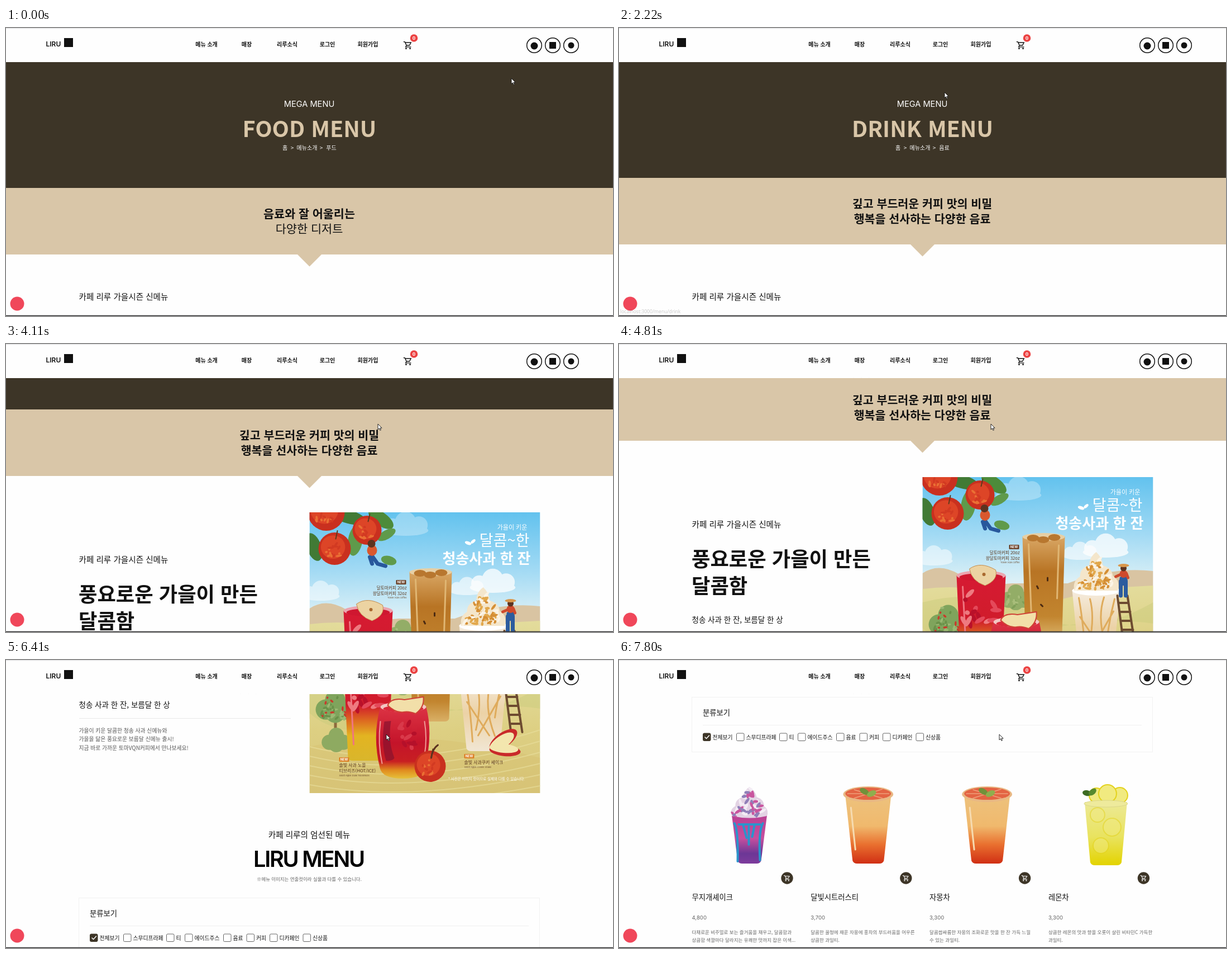
These frames come from a looping animation (1087x515 px, 8 s). An HTML page:

```html
<!DOCTYPE html>
<html lang="ko">
<head>
<meta charset="utf-8">
<title>Cafe menu</title>
<style>
  html, body { margin: 0; width: 100%; height: 100%; overflow: hidden; background: #fefefe; }
  svg { display: block; }
  text { font-family: "Noto Sans CJK KR", "Noto Sans CJK", "Noto Sans CJK JP", sans-serif; }
  .latin { font-family: Inter, "Noto Sans CJK KR", sans-serif; }
  .status { font-family: "Open Sans", sans-serif; }
</style>
</head>
<body>
<script>
const LOOP = 8000, NOTCH = 71.7, DROP = 93;
const BROWN = '#3d3527', TAN = '#d9c6a8', INK = '#111';

// ---------- drawing helpers ----------
const text = (x, middle, size, str, { w = 400, a = 'start', c = INK, ls = 0, cls = '' } = {}) =>
  `<text x="${x}" y="${middle + size * 0.37}" font-size="${size}" font-weight="${w}" text-anchor="${a}" fill="${c}" letter-spacing="${ls}" class="${cls}">${str}</text>`;
const mid = (x, y, size, str, o = {}) => text(x, y, size, str, { a: 'middle', ...o });
const rect = (x, y, w, h, fill, extra = '') => `<rect x="${x}" y="${y}" width="${w}" height="${h}" fill="${fill}" ${extra}/>`;
const oval = (x, y, rx, ry, fill, extra = '') => `<ellipse cx="${x}" cy="${y}" rx="${rx}" ry="${ry}" fill="${fill}" ${extra}/>`;
const dot = (x, y, r, fill, extra) => oval(x, y, r, r, fill, extra);
const path = (d, fill, extra = '') => `<path d="${d}" fill="${fill}" ${extra}/>`;
const line = (d, color, width = 1) => path(d, 'none', `stroke="${color}" stroke-width="${width}" stroke-linecap="round"`);
const group = (id, body, extra = '') => `<g id="${id}" ${extra}>${body}</g>`;
const at = (x, y, body, extra = '') => `<g transform="translate(${x} ${y}) ${extra}">${body}</g>`;
const leaf = (x, y, rx, ry, angle, fill) => oval(x, y, rx, ry, fill, `transform="rotate(${angle} ${x} ${y})"`);
const grad = (id, ...stops) => `<linearGradient id="${id}" x2="0" y2="1">${stops.map(([o, c]) =>
  `<stop offset="${o}" stop-color="${c}"/>`).join('')}</linearGradient>`;
const cup = (x, top, wTop, bottom, wBottom, fill) =>
  path(`M${x - wTop / 2} ${top}L${x - wBottom / 2} ${bottom - 5}q2 5 8 5h${wBottom - 16}q6 0 8-5L${x + wTop / 2} ${top}z`, fill);
const cart = (x, y, scale, color) => at(x, y,
  line('M1 3h2.7l4.3 9h7.5l3.8-7H5M8 12l-2 4h13', color, 2) + dot(7, 20, 2, color) + dot(17, 20, 2, color), `scale(${scale})`);

let seed = 7;
const random = () => (seed = seed * 16807 % 2147483647) / 2147483647;
// Flecks scattered over a trapezoid: half width grows from r0 at y0 to r1 at y1.
const flecks = (n, x, y0, y1, r0, r1, size, ...colors) => Array.from({ length: n }, (_, i) => {
  const p = Math.sqrt(random()), dx = (random() * 2 - 1) * (r0 + (r1 - r0) * p);
  return leaf(x + dx, y0 + (y1 - y0) * p, size * (.5 + random()), size * .5, random() * 180, colors[i % colors.length]);
}).join('');

const defs = `<defs>
  ${grad('sky', [0, '#62c2ee'], [.25, '#a2daf4'], [.45, '#dcf0f6'])}
  ${grad('field', [0, '#e3dc9c'], [.5, '#ddcf82'], [1, '#d8c67c'])}
  ${grad('coffee', [0, '#d9a765'], [.35, '#b87424'], [.8, '#c2852f'], [1, '#d9b066'])}
  ${grad('sunset', [0, '#d61a33'], [.45, '#d01c2b'], [.6, '#dd6a20'], [.75, '#e3b421'], [1, '#d9b62c'])}
  ${grad('tea', [0, '#dc3344'], [.5, '#c4142a'], [.76, '#c81f22'], [.88, '#e08a1e'], [1, '#e6c13a'])}
  ${grad('frappe', [0, '#f5ecdf'], [.5, '#ecd2a6'], [1, '#f1e6d3'])}
  ${grad('galaxy', [0, '#b93f92'], [.5, '#c64f9e'], [.8, '#6c3796'], [1, '#7d3b9c'])}
  ${grad('ruby', [0, '#edc27d'], [.45, '#f0b96d'], [.72, '#e9702f'], [1, '#d02f14'])}
  ${grad('lemon', [0, '#ece996'], [.55, '#e9e35f'], [1, '#e3d300'])}
  <clipPath id="frame"><rect width="413" height="413"/></clipPath>
  <clipPath id="navClip"><rect id="navShape" width="1087" height="61"/></clipPath>
</defs>`;

// ---------- poster ----------
const apple = (x, y, r) => dot(x, y, r, '#c9301f') + oval(x - r * .1, y - r * .1, r * .75, r * .72, '#dd4527') +
  flecks(14, x - r * .1, y - r * .5, y + r * .5, r * .3, r * .5, 4, '#ea7034', '#d23a22') +
  line(`M${x + 2} ${y - r * .6}l3 -${r * .5}`, '#5c3a1c', 2);
const tag = (x, y, fill) => rect(x, y, 18, 8, fill, 'rx="1"') + mid(x + 9, y + 4, 5.6, 'NEW', { w: 700, c: '#fff', cls: 'latin' });
const shrub = (x, y, r, fill) => [[-.6, .2], [.6, .2], [0, -.4], [0, .4]].map(([dx, dy]) => dot(x + dx * r, y + dy * r, r * .65, fill)).join('');
const cloud = (x, y, r, alpha) => `<g opacity="${alpha}">` + dot(x - r, y + r * .3, r * .6, '#fff') + dot(x, y, r * .8, '#fff') +
  dot(x + r, y + r * .2, r * .65, '#fff') + oval(x, y + r * .6, r * 1.7, r * .4, '#fff') + '</g>';

const label = { c: '#5c3a20', w: 500 }, tiny = { c: '#6b4a2c', cls: 'latin' };
const poster = group('poster', `<g clip-path="url(#frame)">` +
  rect(0, 0, 413, 413, 'url(#sky)') +
  cloud(172, 18, 24, .3) + cloud(328, 120, 24, .75) + cloud(282, 130, 18, .6) + cloud(20, 138, 20, .5) +
  path('M0 172Q30 152 66 174T160 190L260 190Q340 160 413 168V280H0z', '#d9c4a2') +
  path('M0 200Q80 190 160 212T300 200L413 194V413H0z', 'url(#field)') +
  path('M0 224Q110 196 200 245T413 224V262Q300 246 180 285T0 270z', '#c8cb7a', 'opacity=".45"') +
  path('M0 330Q180 290 413 350V413H0z', '#d3bd6c', 'opacity=".35"') +
  `<g opacity=".6">` + Array.from({ length: 6 }, (_, i) => line(`M0 ${330 + i * 17}Q180 ${375 + i * 14} 413 ${300 + i * 20}`, '#e9df9f', 2)).join('') + '</g>' +
  leaf(70, 8, 32, 12, 15, '#417a35') + leaf(128, 12, 26, 12, 35, '#4d8b3a') + leaf(82, 50, 28, 13, 100, '#5f9a4b') +
  leaf(8, 62, 26, 13, 70, '#417a35') + leaf(138, 40, 18, 8, -30, '#5f9a4b') + leaf(142, 86, 14, 8, 15, '#5f9a4b') +
  apple(30, 0, 33) + apple(103, 32, 26) + apple(45, 65, 29) +
  line('M112 78l10 14l14 4M108 80l4 12', '#28589c', 7) + oval(112, 68, 9, 10, '#d9582e') + dot(111, 56, 7, '#5d3320') +
  mid(363, 27, 11, '가을이 키운', { c: '#fff' }) +
  mid(349, 50, 27, '달콤~한', { c: '#fff' }) + mid(317, 82, 26, '청송사과 한 잔', { c: '#fff', w: 700 }) +
  leaf(284, 55, 6, 3, 20, '#fff') + leaf(293, 52, 5, 2.5, -40, '#fff') +
  tag(155, 121, '#6b4128') +
  text(174, 135, 7.6, '달토마커피 20oz', { ...label, a: 'end' }) + text(174, 145, 7.6, '왕달토마커피 32oz', { ...label, a: 'end' }) +
  text(174, 152.5, 3.9, 'TOMA VQN Coffee', { ...tiny, a: 'end' }) +
  shrub(167, 215, 22, '#93ad67') + flecks(20, 167, 200, 232, 10, 24, 4, '#7f9f58', '#a8bd7a') +
  rect(44, 270, 5, 52, '#8d6b3d') + shrub(46, 258, 28, '#7fa45c') + shrub(48, 318, 21, '#8eaa61') +
  flecks(30, 46, 232, 280, 14, 28, 4, '#6a9149', '#9bb873') + flecks(10, 46, 232, 276, 12, 26, 3.5, '#c93a2b') +
  // iced coffee
  cup(217, 106, 76, 285, 66, 'url(#coffee)') + oval(217, 107, 38, 7, '#e7cfa4') +
  [[198, 109], [216, 112], [236, 108]].map(([x, y]) => oval(x, y, 11, 6, '#b8772f')).join('') +
  line('M190 120l5 130M244 122l-3 95', '#e0b673', 3) + line('M205 195l2 4M224 180l0 5M212 228l3 3', '#4b2a12', 3) +
  // tall red drink
  cup(105, 176, 88, 355, 72, 'url(#sunset)') + oval(105, 176, 44, 9, '#eba5b0') + oval(105, 179, 39, 7, '#cf1730') +
  path('M84 164Q104 150 131 166Q136 184 112 194Q88 186 84 164z', '#ecd3a2', 'stroke="#c28b4c"') + dot(110, 174, 3, '#a9692f') +
  line('M72 196l7 130', '#ef7680', 3) + flecks(16, 105, 196, 262, 30, 34, 8, '#e4495a', '#b9102a', '#ee7a80') +
  // whipped frappe
  cup(311, 202, 86, 338, 60, 'url(#frappe)') + oval(311, 203, 43, 9, '#fff') +
  path('M311 134Q322 144 323 158Q339 162 341 177Q354 184 350 203H272Q268 186 282 178Q282 162 299 158Q298 144 311 134z', '#f4e6cb') +
  flecks(75, 311, 140, 200, 5, 36, 4.5, '#e2a84c', '#fbf4e6', '#d58f35') +
  line('M280 216q8 45 12 105M300 218q9 34 -2 82M325 215q-14 42 7 96M344 218q-8 30 -12 60M282 250l40 60M342 240l-40 70', '#dfab5c', 3) +
  // ladder and picker
  line('M349 212l12 94M367 212l14 92M352 225h17M354 241h18M356 257h18M359 273h18M361 289h18', '#6d4b30', 4) +
  line('M355 186v26M364 186v26', '#2c5c9e', 7) + rect(353, 178, 14, 16, '#2c5c9e', 'rx="3"') +
  line('M355 174l-9 4M365 172l3 8', '#cf4a2c', 5) + oval(360, 173, 7, 7, '#cf4a2c') + dot(360, 163, 5.5, '#5d3320') + oval(360, 158, 10, 3, '#d9974c') +
  // front glass
  path('M127 259Q112 310 126 368Q130 387 167 387T206 368Q222 310 209 259z', 'url(#tea)') +
  oval(168, 259, 41, 9, '#f3c6c2') + oval(168, 262, 36, 6, '#d9283a') +
  path('M140 256Q146 242 170 246L204 241Q206 260 190 271Q178 266 168 268Q154 270 140 256z', '#f2dfa9', 'stroke="#cf4236" stroke-width="2"') +
  path('M134 285Q128 325 137 355Q150 356 152 350Q140 320 146 284z', '#83122f', 'opacity=".65"') +
  line('M127 285q-5 40 3 75M206 285q5 30 0 60', '#f09a94', 2) + flecks(10, 180, 275, 335, 20, 24, 7, '#d9394a', '#b5102a') +
  apple(216, 365, 28) + line('M218 350Q220 334 230 327', '#5c3320', 3) +
  leaf(347, 318, 29, 13, -35, '#c92a2a') + leaf(344, 322, 26, 11, -35, '#f3e6ae') +
  leaf(350, 337, 28, 10, 5, '#c92a2a') + leaf(348, 333, 26, 8, 5, '#f3e6ae') +
  tag(53, 349, '#dc8127') + text(53, 363, 7.9, '솔빛 사과 노을', label) + text(53, 373, 7.9, '티브리즈(HOT/ICE)', label) +
  text(53, 382, 3.9, 'Solbit Apple Dusk Tea Breeze', tiny) +
  tag(277, 343, '#dc8127') + text(277, 358, 7.9, '솔빛 사과쿠키 셰이크', label) +
  text(277, 366.5, 3.9, 'Solbit Apple Cookie Shake', tiny) +
  mid(317, 388, 6.5, '* 사진은 이미지 컷이므로 실제와 다를 수 있습니다.', { c: '#fff' }) +
  '</g>', 'transform="translate(543.5 470)"');

// ---------- product list ----------
const swirlCup = cup(103, 1278, 64, 1368, 42, 'url(#galaxy)') +
  path('M103 1231Q114 1238 116 1249Q130 1254 129 1265Q139 1272 134 1283Q103 1290 72 1283Q66 1272 78 1265Q77 1254 91 1249Q93 1238 103 1231z', '#e3d3e4') +
  flecks(45, 103, 1234, 1282, 4, 30, 5, '#c9569f', '#f4edf5', '#8f7fb8') +
  line('M76 1296q7 10 6 68M84 1298h38M92 1300l6 22M102 1302v32M112 1300l-4 20M127 1296q-8 14 -5 66', '#2a94cc', 4);
const rubyCup = cup(103, 1246, 82, 1368, 56, 'url(#ruby)') + oval(103, 1244, 45, 14, '#e9b884') +
  oval(103, 1243, 41, 11, '#e36443') + line('M66 1243h74M78 1236l50 15M128 1235l-50 16', '#efa07c', 1.5) +
  leaf(96, 1239, 9, 5, 30, '#71913a') + leaf(109, 1243, 9, 5, -25, '#8fae4d') + line('M72 1268l8 75', '#f6dbb0', 3);
const slice = (x, y, r) => dot(x, y, r, '#f1ea80', 'stroke="#e3d21c" stroke-width="2"');
const lemonCup = cup(103, 1258, 76, 1371, 56, 'url(#lemon)') + slice(86, 1246, 13) + slice(128, 1246, 14) + slice(106, 1243, 16) +
  oval(103, 1261, 39, 6, '#eeea9c', 'stroke="#dbd78a"') +
  `<g opacity=".5">${slice(88, 1281, 13) + slice(114, 1303, 16) + slice(94, 1336, 14)}</g>` +
  leaf(69, 1242, 8, 5, 10, '#3d6b23') + leaf(79, 1240, 8, 5, -40, '#588a2e');

const products = [
  ['무지개셰이크', '4,800', '다채로운 비주얼로 보는 즐거움을 채우고, 달콤함과', '상큼함 색깔마다 달라지는 유쾌한 맛까지 잡은 이색...', swirlCup],
  ['달빛시트러스티', '3,700', '달콤한 꿀청에 재운 자몽에 홍차의 부드러움을 어우른', '상큼한 과일티.', rubyCup],
  ['자몽차', '3,300', '달콤쌉싸름한 자몽의 조화로운 맛을 한 잔 가득 느낄', '수 있는 과일티.', rubyCup],
  ['레몬차', '3,300', '상큼한 레몬의 맛과 향을 오롯이 살린 비타민C 가득한', '과일티.', lemonCup],
].map(([name, price, first, second, art], i) => at(130.5 + 212.8 * i, 0, art +
  dot(170.5, 1394, 10.7, BROWN) + cart(164.5, 1388, .52, '#fff') +
  text(0, 1428.5, 13.3, name) + text(0, 1464.5, 9.6, price, { c: '#666', cls: 'latin' }) +
  text(0, 1490.5, 8.5, first, { c: '#666' }) + text(0, 1504.5, 8.5, second, { c: '#666' }))).join('');

// ---------- page ----------
const crumb = (x, str) => mid(x, 214, 10, str, { w: 500, c: '#fff' });
const hero = rect(0, 61, 1087, 225, BROWN) + mid(543, 136, 14.6, 'MEGA MENU', { c: '#fff', cls: 'latin' }) +
  ['food', 'drink'].map(kind => group(kind, mid(543.5, 180, 39.5, kind.toUpperCase() + ' MENU', { w: 700, c: TAN }) +
    crumb(582.5, kind === 'food' ? '푸드' : '음료'))).join('') +
  crumb(499.5, '홈') + crumb(512.5, '&gt;') + crumb(539, '메뉴소개') + crumb(564.5, '&gt;');
const banner = group('banner', rect(0, 286, 1087, 119, TAN) + path('M522 405h43l-21.5 21.5z', TAN) +
  group('foodSlogan', mid(543, 332, 20.7, '음료와 잘 어울리는', { w: 700 }) + mid(543, 359, 20.8, '다양한 디저트')) +
  group('drinkSlogan', mid(543, 332, 20.6, '깊고 부드러운 커피 맛의 비밀', { w: 700 }) + mid(543, 359, 20.6, '행복을 선사하는 다양한 음료', { w: 700 })));
const promo = group('promo', text(130.5, 555, 14.6, '카페 리루 가을시즌 신메뉴') +
  text(130, 617, 36.3, '풍요로운 가을이 만든', { w: 700 }) + text(130, 665, 36.3, '달콤함', { w: 700 }) +
  text(130.5, 725, 13.5, '청송 사과 한 잔, 보름달 한 상') + rect(131, 749, 379, 1, '#e8e8e8') +
  ['가을이 키운 달콤한 청송 사과 신메뉴와', '가을을 닮은 풍요로운 보름달 신메뉴 출시!', '지금 바로 가까운 토마VQN커피에서 만나보세요!']
    .map((str, i) => text(130.5, 771 + 15.5 * i, 9.8, str, { c: '#555' })).join(''));
const filters = [[150, '전체보기'], [210, '스무디프라페'], [287, '티'], [320, '에이드주스'], [389, '음료'], [430.5, '커피'], [472, '디카페인'], [531.5, '신상품']]
  .map(([x, name], i) => rect(x + .5, 1135, 13.5, 13.5, i ? '#fff' : BROWN, `rx="2" stroke="${i ? '#666' : BROWN}"`) +
    text(x + 17.5, 1142, 9.8, name)).join('') + line('M154 1142l2.5 2.5l5 -5.5', '#fff', 1.5);
const listing = mid(543, 958, 14.6, '카페 리루의 엄선된 메뉴') +
  mid(542, 1000, 39.6, 'LIRU MENU', { w: 600, ls: -2.2, cls: 'latin', c: '#000' }) +
  mid(543, 1037, 8.45, '※메뉴 이미지는 연출컷이라 실물과 다를 수 있습니다.', { c: '#666' }) +
  rect(130.5, 1070.5, 825, 98, 'none', 'stroke="#f2f2f2"') + text(150, 1098, 13.3, '분류보기') +
  rect(150, 1120, 786, 1, '#f0f0f0') + filters + products;

// ---------- navigation ----------
const menus = [[359, '메뉴 소개', '음료', '푸드', '상품'], [431, '매장', '매장찾기'],
  [503.5, '리루소식', 'Notice', 'FAQ', '고객센터', '이벤트'], [575.5, '로그인'], [648, '회원가입']];
const nav = `<g clip-path="url(#navClip)">` + rect(0, 0, 1087, 154, '#fefefe') +
  group('hover', rect(333, 0, 52, 154, TAN) + rect(338, 46, 42, 1, BROWN)) +
  menus.map(([x, title, ...items]) => mid(x, 29.5, 10, title, { w: 700 }) +
    items.map((item, i) => mid(x, 66 + 23.3 * i, 10, item, { w: 700, cls: /^\w/.test(item) ? 'latin' : '' })).join('')).join('') +
  text(71.5, 29, 12, 'LIRU', { w: 600, cls: 'latin' }) + rect(104, 18, 16, 16, INK) +
  cart(711.5, 22.5, .71, INK) + dot(730.5, 18, 6.8, '#ec4343') + mid(730.5, 18, 8, '0', { w: 700, c: '#fff', cls: 'latin' }) +
  [946, 979, 1012].map(x => dot(x, 31, 13.3, '#fff', `stroke="${INK}" stroke-width="1.5"`)).join('') +
  dot(946, 32, 6.5, INK) + rect(973, 25, 12, 12, INK) + dot(1012, 31, 5.5, INK) +
  '</g>' + rect(0, 0, 1087, 1.3, '#e3e3e5');

const chrome = dot(20, 493, 12.5, '#f0475a') +
  group('status', group('statusBack', rect(0, 499, 111, 15, '#ece2f1')) + text(2, 506.5, 8.6, 'localhost:3000/menu/drink', { c: '#666', cls: 'status' })) +
  rect(0, 513.7, 1087, 1.3, '#2b2b2d');
const outline = 'stroke="#111" stroke-width=".9" stroke-linejoin="round"';
const cursor = group('arrow', path('M0 0v10l2.3-2.2 1.6 3.6 1.6-.7-1.6-3.5h3.2z', '#fff', outline)) +
  group('hand', path('M-1 1q1-2 2 0v5l6 1q1 0 1 2l-1 5h-6l-4-5q0-2 2-1z', '#fff', outline));

document.body.innerHTML = `<svg width="1087" height="515" viewBox="0 0 1087 515">${defs}` +
  group('page', hero + banner + promo + poster + listing) + nav + chrome + cursor + '</svg>';

// ---------- motion ----------
const bursts = [[200, 1000], [1100, 1820], [1920, 2620], [3010, 3210], [3410, 3410], [3910, 4310],
  [4810, 5210], [5610, 5710], [6010, 6410], [6700, 7100], [7600, 7800]];
const wheel = [[3010, 3210, 1], [3910, 4310, 2], [4810, 5210, 3], [6010, 6410, 3], [6700, 7100, 3], [7600, 7800, 2]];
const pointer = [[100, 905, 90], [400, 700, 50], [800, 348, 27], [1100, 347, 28], [1300, 358, 64], [1500, 358, 66],
  [1800, 400, 88], [2220, 583, 115], [2620, 666, 143], [5510, 666, 143], [5710, 681, 133]];

const progress = (t, from, to) => Math.min(1, Math.max(0, (t - from) / (to - from)));
const ease = p => p < .5 ? 2 * p * p : 1 - 2 * (1 - p) ** 2;
const $ = id => document.getElementById(id);
const show = (id, on) => $(id).setAttribute('opacity', +on);
const move = (id, x, y) => $(id).setAttribute('transform', `translate(${x} ${y})`);

// The screen refreshes every 100 ms while something is moving.
function refreshTime(t) {
  const burst = bursts.filter(b => b[0] <= t).pop();
  return burst ? Math.min(burst[1], burst[0] + Math.floor((t - burst[0]) / 100) * 100) : 0;
}

function pointerAt(t) {
  const next = pointer.findIndex(k => k[0] > t);
  if (next < 1) return next ? pointer[pointer.length - 1].slice(1) : pointer[0].slice(1);
  const [t0, x0, y0] = pointer[next - 1], [t1, x1, y1] = pointer[next], p = progress(t, t0, t1);
  return [x0 + (x1 - x0) * p, y0 + (y1 - y0) * p];
}

function draw(clock) {
  const t = refreshTime(clock);
  const open = DROP * (ease(progress(t, 450, 800)) - ease(progress(t, 1550, 1820)));
  const scroll = wheel.reduce((sum, [from, to, n]) => sum + NOTCH * n * ease(progress(t, from - 100, to)), 0);
  const isDrink = t >= 1800, loaded = t >= 3010;
  const enter = progress(t, 1800, 2620);

  move('page', 0, Math.round(open - scroll));
  $('navShape').setAttribute('height', 61 + open);
  show('food', !isDrink);
  show('foodSlogan', !isDrink);
  show('drink', isDrink);
  show('drinkSlogan', isDrink);
  move('banner', 0, isDrink ? Math.round(-77 * (1 - enter) ** 2) : 0);
  show('banner', isDrink ? Math.min(1, enter * 2.5) : 1);
  move('promo', 0, loaded ? 0 : -74);
  show('poster', loaded);
  show('hover', t >= 700 && t < 1700);
  show('status', .55 * progress(t, 800, 900) + .45 * progress(t, 900, 1000) - .65 * progress(t, 2020, 2220) - .35 * progress(t, 2220, 2420));
  show('statusBack', .85 * (1 - progress(t, 2020, 2220)));

  const onLink = t >= 700 && t < 1700, [x, y] = pointerAt(t);
  show('hand', onLink);
  show('arrow', !onLink);
  move('hand', x, y);
  move('arrow', x, y);
}

const start = performance.now();
(function tick() {
  draw((performance.now() - start) % LOOP);
  requestAnimationFrame(tick);
})();
</script>
</body>
</html>
```
